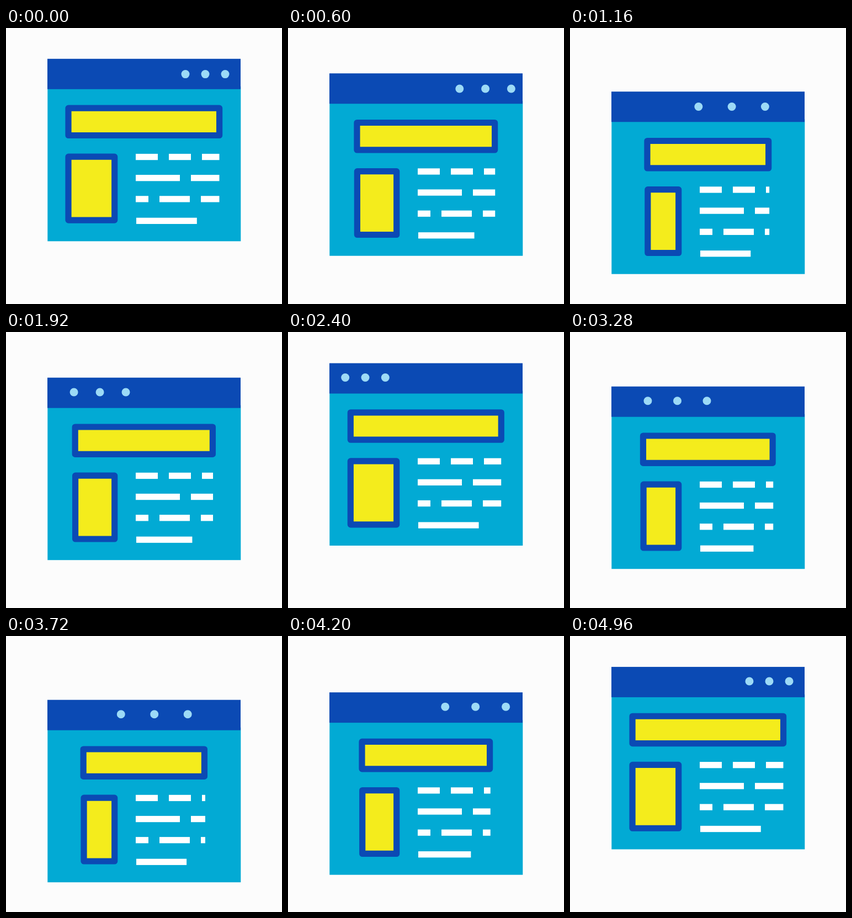
An HTML page with a canvas for the animation above (5 s loop, 500 by 500 pixels).

```html
<!DOCTYPE html>
<html lang="en">
<head>
<meta charset="utf-8">
<title>Responsive window</title>
<style>
  html, body { margin: 0; width: 100%; height: 100%; overflow: hidden; background: #fcfcfc; }
  canvas { display: block; width: 500px; height: 500px; }
</style>
</head>
<body>
<canvas id="stage" width="500" height="500"></canvas>
<script>
const ctx = document.getElementById('stage').getContext('2d');
const LOOP = 5000, HALF = 2500, STEP = 40, LAG = 12.5;
const COLORS = {
  page: '#fcfcfc', header: '#0b4ab4', body: '#02aad4',
  yellow: '#f4ec1c', dot: '#9cdaf6', text: '#ffffff'
};

// Text rows: offset from the window top, then [left, right] of each dash.
const ROWS = [
  [172.1, [235, 275], [295, 335], [355, 386.5]],
  [210.2, [235, 315], [335, 386.5]],
  [248.4, [235, 258], [278, 333], [353, 386.5]]
];

const clamp = v => Math.min(1, Math.max(0, v));
const smooth = s => s * s * (3 - 2 * s);

// cubic-bezier(.5, 0, .5, 1), solved by bisection
function easeInOut(x) {
  let lo = 0, hi = 1;
  for (let i = 0; i < 24; i++) {
    const s = (lo + hi) / 2;
    if (1.5 * s * (1 - s) + s ** 3 < x) lo = s; else hi = s;
  }
  return smooth((lo + hi) / 2);
}

// 0 = wide and raised, 1 = narrow and lowered
function squeezeAt(t) {
  const u = ((t - LAG + LOOP) % HALF) / (HALF / 2);
  return easeInOut(u < 1 ? u : 2 - u);
}

// 0 = dots on the right, 1 = dots on the left
function travelAt(t) {
  const mirrored = t > HALF + LAG ? LOOP + 2 * LAG - t : t;
  return smooth(clamp((mirrored - 460) / 1900));
}

function fillBox(color, left, top, right, bottom) {
  ctx.fillStyle = color;
  ctx.fillRect(left, top, right - left, bottom - top);
}

function framedBox(left, top, right, bottom) {
  ctx.beginPath();
  ctx.rect(left, top, right - left, bottom - top);
  ctx.fillStyle = COLORS.yellow;
  ctx.fill();
  ctx.stroke();
}

function drawDots(t, top, squeeze) {
  const travel = travelAt(t);
  const center = 361 - 221 * travel;
  const gap = 36 + 24.5 * squeeze;
  const settle = t < HALF ? travel : 1;
  const y = top + 27.8 - 1.8 * settle;
  ctx.fillStyle = COLORS.dot;
  for (const i of [-1, 0, 1]) {
    ctx.beginPath();
    ctx.arc(center + i * gap, y, 7.5, 0, 2 * Math.PI);
    ctx.fill();
  }
}

function drawText(top, squeeze) {
  const limit = 386.5 - 25.6 * squeeze;
  const dash = (left, y, right) =>
    fillBox(COLORS.text, left, top + y, right, top + y + 11.3);
  for (const [y, ...dashes] of ROWS) {
    for (const [left, right] of dashes) dash(left, y, Math.min(right, limit));
  }
  dash(236, 287.9, 345.8 - 18.7 * squeeze);
}

function draw(t) {
  const squeeze = squeezeAt(t);
  const top = 55.8 + 60 * squeeze;

  fillBox(COLORS.page, 0, 0, 500, 500);
  fillBox(COLORS.body, 75.3, top + 50, 425.3, top + 330.5);
  fillBox(COLORS.header, 75, top, 425, top + 55);

  ctx.strokeStyle = COLORS.header;
  ctx.lineWidth = 11.2;
  ctx.lineJoin = 'round';
  const inset = 27.2 * squeeze;
  framedBox(113 + inset, top + 89.3, 386.6 - inset, top + 138.7);
  framedBox(113 + 28.1 * squeeze, top + 177.4, 196.7, top + 292.3);

  drawText(top, squeeze);
  drawDots(t, top, squeeze);
}

function tick() {
  const t = performance.now() % LOOP;
  draw(Math.floor(t / STEP) * STEP);
  requestAnimationFrame(tick);
}
tick();
</script>
</body>
</html>
```
